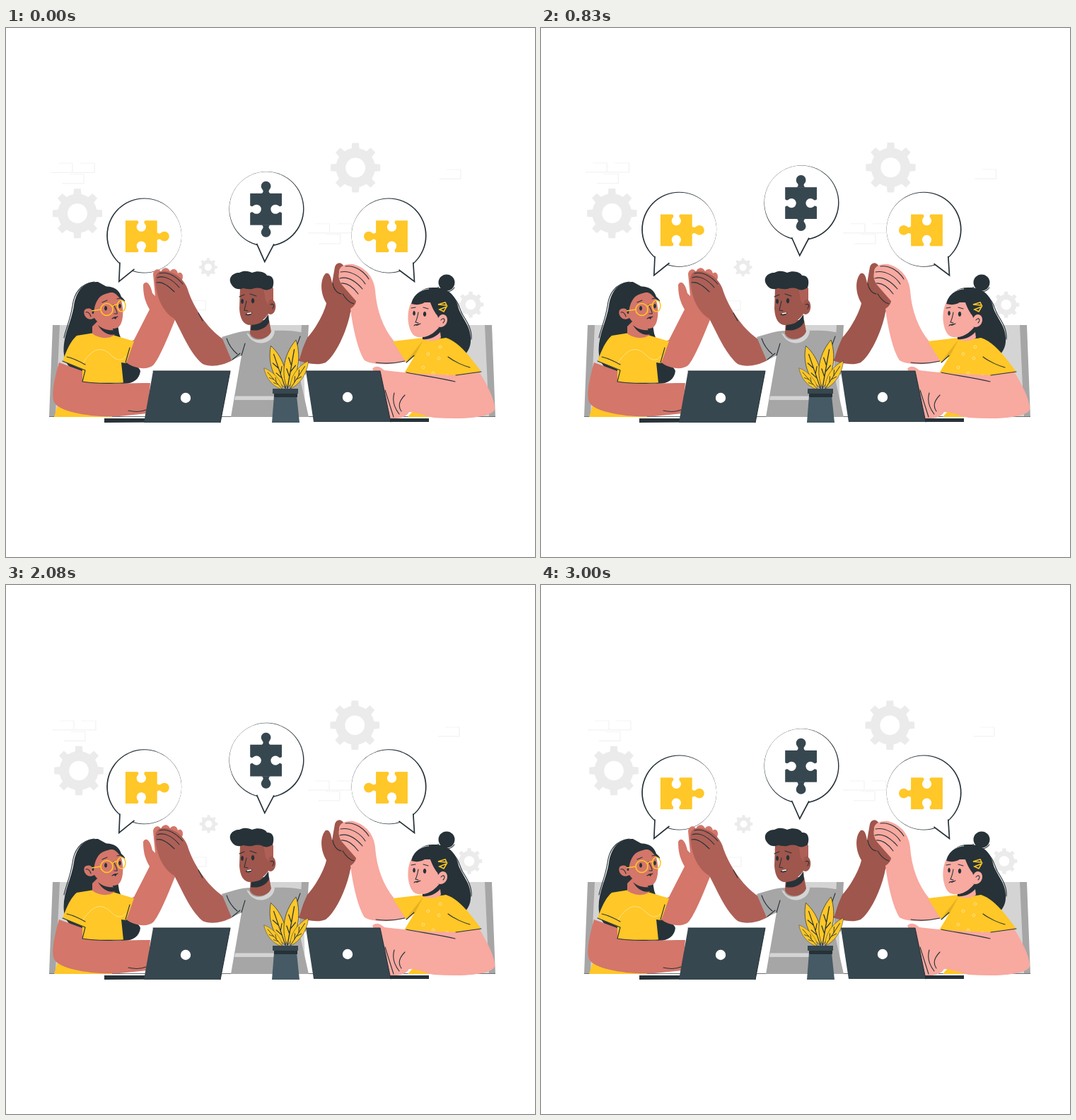
Recreate the animation shown at these times as an HTML page. Size 748x748 px, loop 3.04 s.

```html
<!DOCTYPE html>
<html lang="en">
<head>
<meta charset="utf-8">
<title>Team high five</title>
<style>
html, body { margin: 0; width: 100%; height: 100%; overflow: hidden; background: #fff; }
svg { display: block; width: 100vw; height: 100vh; }
.ink { fill: #263238; }
.slate { fill: #37474f; }
.sun { fill: #ffc727; }
.rose { fill: #d4766a; }
.clay { fill: #ae6057; }
.brown { fill: #9f564c; }
.pink { fill: #f8a9a0; }
.ash { fill: #a6a6a6; }
.pale { fill: #d4d4d4; }
.line { fill: none; stroke: #263238; stroke-width: 1.1; stroke-linecap: round; stroke-linejoin: round; }
.gold { fill: none; stroke: #ffc727; stroke-width: 1.6; }
.light { fill: none; stroke: #fff; stroke-width: .8; }
</style>
</head>
<body>
<svg viewBox="0 0 748 748">
  <g id="back"></g>

  <!-- chairs -->
  <path class="pale" d="M75 420H150V550H70ZM646 420H678L684 550H600ZM370 420H420L423 550H345Z"/>
  <path class="ash" d="M66 420H76L70 550H61ZM677 420H687L692 550H683ZM418 420H428L424 490H414Z"/>
  <path d="M61 549.5H692" stroke="#6b7276"/>

  <g id="bubbles"></g>

  <!-- woman on the left -->
  <path class="ink" d="M130 359C108 358 99 374 96 392C93 415 79 437 82 462C84 480 100 492 130 494L165 503C178 504 189 497 190 485C188 478 180 478 174 471L160 432L150 370Z"/>
  <path class="line" d="M125 359C105 361 96 376 94 393C91 412 85 424 82 438"/>
  <path class="rose" d="M168 447L181 441L203 398C196 386 194 376 194 363C198 356 204 361 207 375L211 379L208 348C209 340 217 339 219 345C221 338 229 337 232 344C235 339 242 340 243 347C248 343 252 350 249 356L242 405C232 430 217 468 208 477C200 484 180 482 169 472Z"/>
  <path class="sun" d="M100 435L125 431C135 437 143 438 151 434L181 443L170 474L163 473L166 502H108V483L80 471C86 455 91 443 100 435ZM74 530L68 550H150V530Z"/>
  <path class="rose" d="M122 422L129 415L150 423L154 433C148 440 132 440 122 432Z"/>
  <path class="ink" d="M130 420C137 426 144 428 154 427L155 433C145 436 136 430 130 420Z"/>
  <path class="rose" d="M127 377C140 367 157 370 161 380C168 396 166 418 159 423C149 429 132 421 125 410C115 416 108 405 111 399C115 395 121 396 124 402Z"/>
  <path class="ink" d="M122 404C119 385 122 372 134 367C146 363 159 367 163 380C166 383 169 385 168 387C161 385 158 376 151 374C144 374 142 376 138 377C130 380 125 390 124 404Z"/>
  <path class="line" d="M113 402C116 401 119 404 120 408M152 391C155 397 158 402 157 404L153 404M150 411C153 409 156 409 158 408M136 388L143 385M157 383L162 382"/>
  <path class="ink" d="M141 393a2 3.3 0 1 0 .1 0ZM161 390a1.8 3.2 0 1 0 .1 0ZM151 409L157 408L155 412Z"/>
  <path class="gold" d="M151 398a8.5 8.5 0 1 1-17 0a8.5 8.5 0 1 1 17 0ZM169 393a5.8 8 0 1 1-11.6 0a5.8 8 0 1 1 11.6 0ZM150 394C153 391 155 390 158 391M134 398L121 400"/>
  <path d="M108 475C125 448 138 452 149 463C157 471 165 471 169 464" fill="none" stroke="#ffe18a"/>
  <path class="rose" d="M75 473L108 485V500C140 504 175 502 204 502L200 545L160 549C120 551 75 543 68 529C63 518 70 491 75 473Z"/>
  <path class="line" d="M80 471L112 484L108 500M86 465C95 467 105 472 112 476M169 473L175 452M108 500C130 504 150 502 166 502M173 541C182 543 191 543 198 540"/>

  <!-- man in the middle -->
  <path class="clay" d="M211 356C211 343 222 342 231 345C246 349 255 361 258 373C265 393 283 424 307 440L320 470C305 478 289 480 278 475C261 461 250 434 238 411C222 402 212 380 211 356Z"/>
  <path class="line" d="M213 360C220 358 228 363 238 373M214 353C224 349 236 356 245 367M217 347C229 344 241 352 250 362M272 403L278 414"/>
  <path class="brown" d="M426 438C439 424 451 400 453 389C444 375 444 355 452 347C458 345 460 354 461 361L465 338C467 331 474 330 478 337L497 387L487 402C482 429 466 463 452 473C440 478 425 474 412 470Z"/>
  <path class="line" d="M462 361C463 369 468 375 474 376M476 376C481 384 487 389 492 390"/>
  <path class="ash" d="M305 437C318 433 333 428 346 428H376C393 427 412 428 426 432L415 468L410 470L428 550H318L333 463L319 470Z"/>
  <path class="pale" d="M324 520.5H394V526H323ZM344 433C347 445 372 444 375 427L380 428C379 447 350 454 340 431Z"/>
  <path class="line" d="M320 469L331 460M333 463L338 446M312 439C315 448 321 456 327 461M413 467L405 452M416 436L411 450"/>
  <path class="brown" d="M346 413H372L375 429C371 441 350 444 345 432Z"/>
  <path class="ink" d="M347 419C356 421 365 415 371 405L372 416C367 426 355 429 346 427Z"/>
  <path class="brown" d="M331 367L330 397C331 413 337 421 347 420C357 419 366 412 371 404C380 409 385 392 378 385L377 364Z"/>
  <path class="clay" d="M364 367L378 368V384C374 382 371 386 371 391L367 385Z"/>
  <path class="ink" d="M319 363C313 354 320 346 330 346C337 342 344 344 348 346C358 342 367 346 369 350C378 349 380 358 377 367C373 370 369 371 365 370C360 367 355 367 351 368C344 371 339 368 335 368C328 371 322 368 319 363Z"/>
  <path class="ink" d="M334 383a2 3.5 0 1 0 .1 0ZM349 382a2.2 3.7 0 1 0 .1 0ZM338 405L348 402C348 406 342 408 338 405Z"/>
  <path class="line" d="M330 380L337 377M345 376L354 379M340 386C339 392 337 398 337 399L342 400M374 391C378 389 380 392 377 397"/>
  <path d="M341 404L347 403" stroke="#fff" stroke-width="1.4"/>

  <!-- woman on the right -->
  <circle class="ink" cx="623" cy="360" r="11.5"/>
  <path class="line" d="M611 366C611 374 627 377 634 367"/>
  <path class="ink" d="M573 389C578 373 592 366 606 367C624 367 635 377 639 393C642 407 656 419 657 437C658 449 654 457 648 463L600 462L588 400Z"/>
  <path class="line" d="M629 377C641 387 641 398 646 406C653 417 659 427 658 440"/>
  <path class="light" d="M574 383C580 374 590 369 598 369"/>
  <path class="pink" d="M471 346C470 337 480 333 491 334C507 338 520 351 522 371C524 400 534 425 548 442L568 470C550 476 520 478 507 470C497 455 490 421 487 397C492 394 495 389 495 386L474 362C470 355 470 350 471 346Z"/>
  <path class="line" d="M474 361C484 360 492 368 498 376M472 354C485 350 497 361 504 369M473 345C487 342 502 352 508 362M480 337C494 335 507 345 513 355M523 473C536 475 551 474 564 471"/>
  <path class="sun" d="M547 443L590 438C600 441 612 440 622 438C641 444 657 466 672 486L636 491L635 500L563 488L577 465L566 473ZM576 541L568 550H608L604 541Z"/>
  <path d="M590 441L578 464L567 470Z" fill="#e3b023"/>
  <path class="pink" d="M591 426L613 422L615 438C609 444 596 443 588 440Z"/>
  <path class="ink" d="M589 437C600 436 608 429 614 421V430C607 438 597 441 589 440Z"/>
  <path class="pink" d="M573 388C566 401 567 424 576 434C584 441 603 437 611 422C619 426 627 416 623 408C619 403 614 405 611 410L606 388Z"/>
  <path class="ink" d="M573 390C583 393 592 390 598 383C602 394 606 403 612 409L619 390L606 371C590 368 578 379 573 390Z"/>
  <path class="gold" d="M611 391L621 388L623 392ZM613 398L623 394L619 401Z"/>
  <path class="ink" d="M577 400a1.8 3.3 0 1 0 .1 0ZM592 401a2.2 3.5 0 1 0 .1 0ZM577 419L585 419L581 421Z"/>
  <path class="line" d="M573 396L579 395M590 395L597 397M583 402C582 408 580 414 579 416L583 417M577 421C579 418 583 420 586 418M615 413C619 408 622 413 618 417"/>
  <g fill="none" stroke="#ffe18a"><circle cx="597" cy="461" r="2"/><circle cx="612" cy="467" r="2"/><circle cx="590" cy="480" r="2"/><circle cx="604" cy="488" r="2"/><circle cx="624" cy="492" r="2"/><circle cx="614" cy="451" r="2"/></g>
  <path class="pink" d="M518 482C522 477 528 478 535 484C570 488 601 490 636 491L669 486C680 504 692 527 691 539C688 551 645 554 605 551C590 548 580 542 570 543C566 550 557 553 541 552L528 500Z"/>
  <path class="line" d="M566 473L577 463M636 491L672 486M625 465C634 472 648 478 656 480M635 500C610 494 585 491 566 487M536 512L548 550M549 516C546 526 549 537 556 546M564 519C556 527 554 535 559 542"/>

  <!-- desk -->
  <path class="ink" d="M139 552H303V557L139 558ZM435 552H598V557H435Z"/>
  <path class="slate" d="M208 485H317L303 558H195ZM424 485H529L544 557H435Z"/>
  <path class="line" d="M208 485H317L303 558M424 485H529L544 557"/>
  <circle cx="254" cy="523" r="7.2" fill="#fff"/>
  <circle cx="483" cy="522" r="7.2" fill="#fff"/>
  <g id="plant"></g>
  <path d="M379 520H411L415 558H376Z" fill="#455a64"/>
  <path class="slate" d="M377 510H413V517H377Z"/>
  <path class="ink" d="M379 517H412V522H379Z"/>
</svg>
<script>
const LOOP = 3040, PULSE = 1085;
const $ = id => document.getElementById(id);
const back = $("back"), bubbles = $("bubbles");

function gear(x, y, r) {
  let teeth = "";
  for (let a = 0; a < 360; a += 45)
    teeth += `<path d="M-5.6 -24L-4.7 -34.5H4.7L5.6 -24Z" fill="#ebebeb" transform="rotate(${a})"/>`;
  return `<g transform="translate(${x} ${y}) scale(${r / 34.5})">${teeth}
    <circle r="20.5" fill="none" stroke="#ebebeb" stroke-width="13.5"/></g>`;
}

const brick = (x, y) => `<g fill="none"><path d="M${x + 10} ${y}H${x + 30}" stroke="#f4f4f4"/>
  <path d="M${x} ${y + 13}H${x + 30}V${y}" stroke="#ebebeb" stroke-width=".8"/></g>`;

back.innerHTML =
  [[66, 192], [97, 192], [82, 207.5], [427, 277], [458, 277], [442, 292], [611, 201], [253, 385], [68, 438], [651, 441]]
    .map(p => brick(...p)).join("") +
  gear(103, 262.5, 34.8) + gear(493.3, 198.3, 34.8) + gear(655, 390.5, 18.3) + gear(286.5, 338, 12.8);

// Puzzle piece around 0,0 with its knobs on the x axis
function puzzle(x, y, turn, color, knobs) {
  const knob = k => `<path d="M${k * 22} -6Q${k * 25} -2.5 ${k * 28} -5V5Q${k * 25} 2.5 ${k * 22} 6Z"/><circle cx="${k * 32.6}" r="6.9"/>`;
  const hole = k => `<circle cy="${k * 13.4}" r="6.6"/><path d="M-6 ${k * 23}Q-2.5 ${k * 20.5} -5 ${k * 17}H5Q2.5 ${k * 20.5} 6 ${k * 23}Z"/>`;
  return `<g transform="translate(${x} ${y}) rotate(${turn})" fill="${color}">
    <rect x="-22.4" y="-22.4" width="44.8" height="44.8"/>${knobs.map(knob).join("")}
    <g fill="#fff">${hole(-1)}${hole(1)}</g></g>`;
}

// The outline is thick on the side facing away from (dx, dy)
const bubble = (x, y, dx, dy, tail) => `<circle class="ink" cx="${x}" cy="${y}" r="53"/>
  <circle cx="${x + dx}" cy="${y + dy}" r="52.1" fill="#fff"/>
  <path d="${tail}" fill="#fff" stroke="#263238" stroke-width="1.7"/>`;

bubbles.innerHTML =
  bubble(195.2, 293.5, .8, .1, "M161 331.5L159.8 358.5L181.5 341") + puzzle(191.3, 294.7, 0, "#ffc727", [1]) +
  bubble(368.5, 256, -.5, -.6, "M354.5 305L365.8 330.5L379 305.5") + puzzle(367.6, 256.3, 90, "#37474f", [-1, 1]) +
  bubble(541.6, 293.5, -.8, .1, "M555.5 342L577.5 358.5L575.8 331.5") + puzzle(545.5, 294.7, 0, "#ffc727", [-1]);

const leaf = (x, y, turn, h) => `<g transform="translate(${x} ${y}) rotate(${turn}) scale(${h / 60})">
  <path class="sun" stroke="#263238" stroke-width=".6" d="M0 0C-9 -12 -14 -36 0 -60C12 -38 9 -12 0 0Z"/>
  <path class="line" stroke-width=".8" d="M0 6V-48M0 -14L-5 -23M0 -20L5 -29M0 -28L-5 -37"/></g>`;
$("plant").innerHTML = leaf(395, 509, -19, 63) + leaf(398, 509, 10, 69) + leaf(391, 511, -41, 40) + leaf(402, 510, 33, 47);

const swell = [[0, .08], [200, .38], [320, .97], [350, 1.04], [400, .93], [550, .54], [690, .27], [830, .11], [980, 0], [PULSE, .08]];

function pulse(t) {
  if (t > 2 * PULSE - 105) return 0;
  const u = t % PULSE, i = swell.findIndex(p => p[0] > u);
  const [a, v] = swell[i - 1], [b, w] = swell[i];
  return v + (w - v) * (u - a) / (b - a);
}

function draw(now) {
  const t = now % LOOP;
  const lift = 9 * Math.abs(Math.sin((t + 15) * Math.PI / 1510)) ** 1.6;
  bubbles.setAttribute("transform", `translate(0 ${-lift})`);
  back.setAttribute("transform", `translate(378 306) scale(${1 + .09 * pulse(t)}) translate(-378 -306)`);
  requestAnimationFrame(draw);
}
requestAnimationFrame(draw);
</script>
</body>
</html>
```
